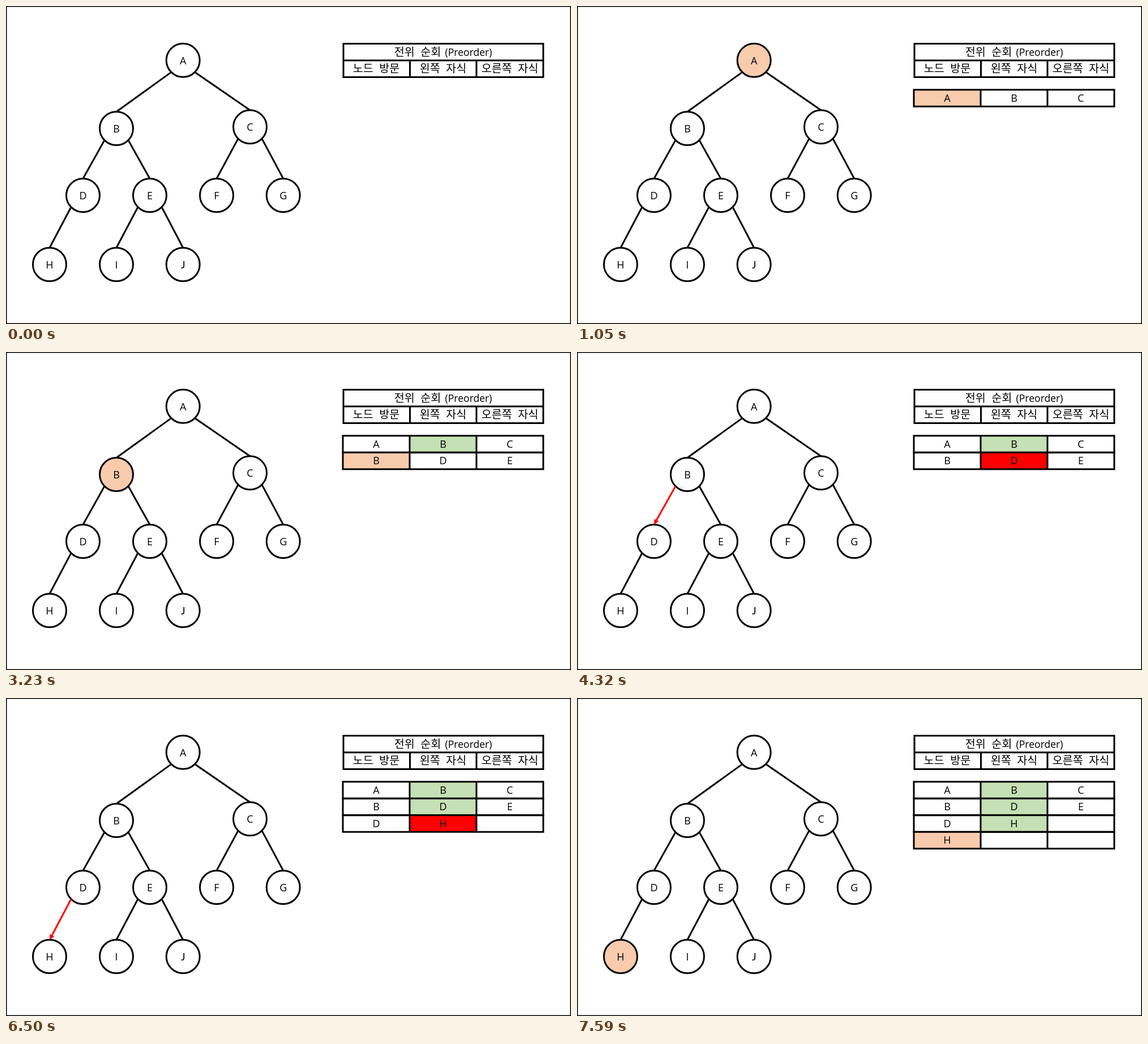
Write an HTML page that moves like this. It is 998x561 px and loops after 8 s.

```html
<!DOCTYPE html>
<html lang="ko">
<head>
<meta charset="utf-8">
<style>
  html, body { margin: 0; width: 100%; height: 100%; overflow: hidden; background: #fff; }
  svg { display: block; width: 100%; height: 100%; }
  text { font: 18px "Open Sans", "Noto Sans", sans-serif; text-anchor: middle; }
  .ko { font: 19.6px "Noto Sans CJK KR", "Noto Sans CJK", sans-serif; word-spacing: 5px; }
  .line { fill: none; stroke: #000; stroke-width: 3; }
</style>
</head>
<body>
<svg id="stage" viewBox="0 0 998 561"></svg>
<script>
const LOOP = 8000, FIRST = 1050, STEP = 1090;
const ORANGE = '#f8cbad', GREEN = '#c5e0b4', RED = '#ff0000';
const R = 29.5, OFFSET = 21.3;
const COLS = [595, 713, 831, 949], CENTERS = [654, 772, 890];
const TOP = 147.7, ROW = 29.5;

const nodes = {
  A: [312.7, 95.8], B: [195, 216], C: [431, 213.3], D: [136, 334], E: [254, 334],
  F: [372, 334], G: [489.7, 334], H: [77, 456], I: [195, 456], J: [312.7, 456]
};
const children = { A: 'BC', B: 'DE', C: 'FG', D: 'H', E: 'IJ' };
const path = 'ABDH';
const stage = document.getElementById('stage');

function add(parent, tag, attrs, text) {
  const el = document.createElementNS('http://www.w3.org/2000/svg', tag);
  for (const key in attrs) el.setAttribute(key, attrs[key]);
  if (text) el.textContent = text;
  parent.appendChild(el);
  return el;
}

const line = (parent, d) => add(parent, 'path', { d, class: 'line' });
const show = (el, on) => el.setAttribute('visibility', on ? 'visible' : 'hidden');

add(stage, 'rect', { width: 998, height: 561, fill: '#fff' });
add(stage, 'rect', { x: .75, y: .75, width: 996.5, height: 559.5, fill: 'none', stroke: '#000', 'stroke-width': 1.5 });

// Tree
const circles = {};
for (const name in nodes) {
  const [cx, cy] = nodes[name];
  circles[name] = add(stage, 'circle', { cx, cy, r: R, class: 'line' });
  const label = add(stage, 'text', { x: cx, y: cy + 7 }, name);
  if (name === 'J') label.style.fontFamily = 'Lato, sans-serif';
}

const edges = {}, arrows = {};
for (const parent in children) {
  [...children[parent]].forEach((child, i) => {
    const [px, py] = nodes[parent], [x, cy] = nodes[child];
    const x0 = px + (i ? OFFSET : -OFFSET), y0 = py + OFFSET, y = cy - R;
    edges[child] = line(stage, `M${x0} ${y0}L${x} ${y}`);
    if (!path.includes(child)) return;
    const len = Math.hypot(x - x0, y - y0), ux = (x - x0) / len, uy = (y - y0) / len;
    const bx = x - ux * 9, by = y - uy * 9, wx = -uy * 4.5, wy = ux * 4.5;
    const g = arrows[child] = add(stage, 'g', {});
    add(g, 'path', { d: `M${x0} ${y0}L${bx + ux} ${by + uy}`, stroke: RED, 'stroke-width': 3 });
    add(g, 'path', { d: `M${x} ${y}L${bx + wx} ${by + wy}L${bx - wx} ${by - wy}Z`, fill: RED });
  });
}

// Table heading
line(stage, 'M596 66.5H949V125.5H596ZM596 96H949M713.5 96V125.5M831 96V125.5');
add(stage, 'text', { x: 727, y: 88, class: 'ko' }, '전위 순회');
add(stage, 'text', { x: 817, y: 88, style: 'font-size:17.6px' }, '(Preorder)');
['노드 방문', '왼쪽 자식', '오른쪽 자식'].forEach((label, i) =>
  add(stage, 'text', { x: CENTERS[i], y: 117.3, class: 'ko' }, label));

// Table rows
const rows = [...path].map((name, i) => {
  const g = add(stage, 'g', {}), y = TOP + i * ROW;
  const cells = [0, 1].map(c =>
    add(g, 'rect', { x: COLS[c], y, width: 118, height: ROW, fill: 'none' }));
  line(g, `M595 ${y}H949V${y + ROW}H595ZM713 ${y}V${y + ROW}M831 ${y}V${y + ROW}`);
  [...name + (children[name] || '')].forEach((label, c) =>
    add(g, 'text', { x: CENTERS[c], y: y + 20.9 }, label));
  return { g, cells };
});

function render(t) {
  const step = t < FIRST ? 0 : 1 + Math.floor((t - FIRST) / STEP);
  const visiting = step % 2 === 1;
  const current = Math.ceil(step / 2) - 1;
  const target = !visiting && step ? path[current + 1] : '';

  for (const name in circles)
    circles[name].style.fill = visiting && name === path[current] ? ORANGE : 'none';
  for (const child in arrows) {
    show(arrows[child], child === target);
    show(edges[child], child !== target);
  }
  rows.forEach(({ g, cells }, i) => {
    const active = i === current;
    show(g, i <= current);
    cells[0].setAttribute('fill', active && visiting ? ORANGE : 'none');
    cells[1].setAttribute('fill', i < current ? GREEN : active && !visiting ? RED : 'none');
  });
}

const start = performance.now();
function tick() {
  render((performance.now() - start) % LOOP);
  requestAnimationFrame(tick);
}
tick();
</script>
</body>
</html>
```
